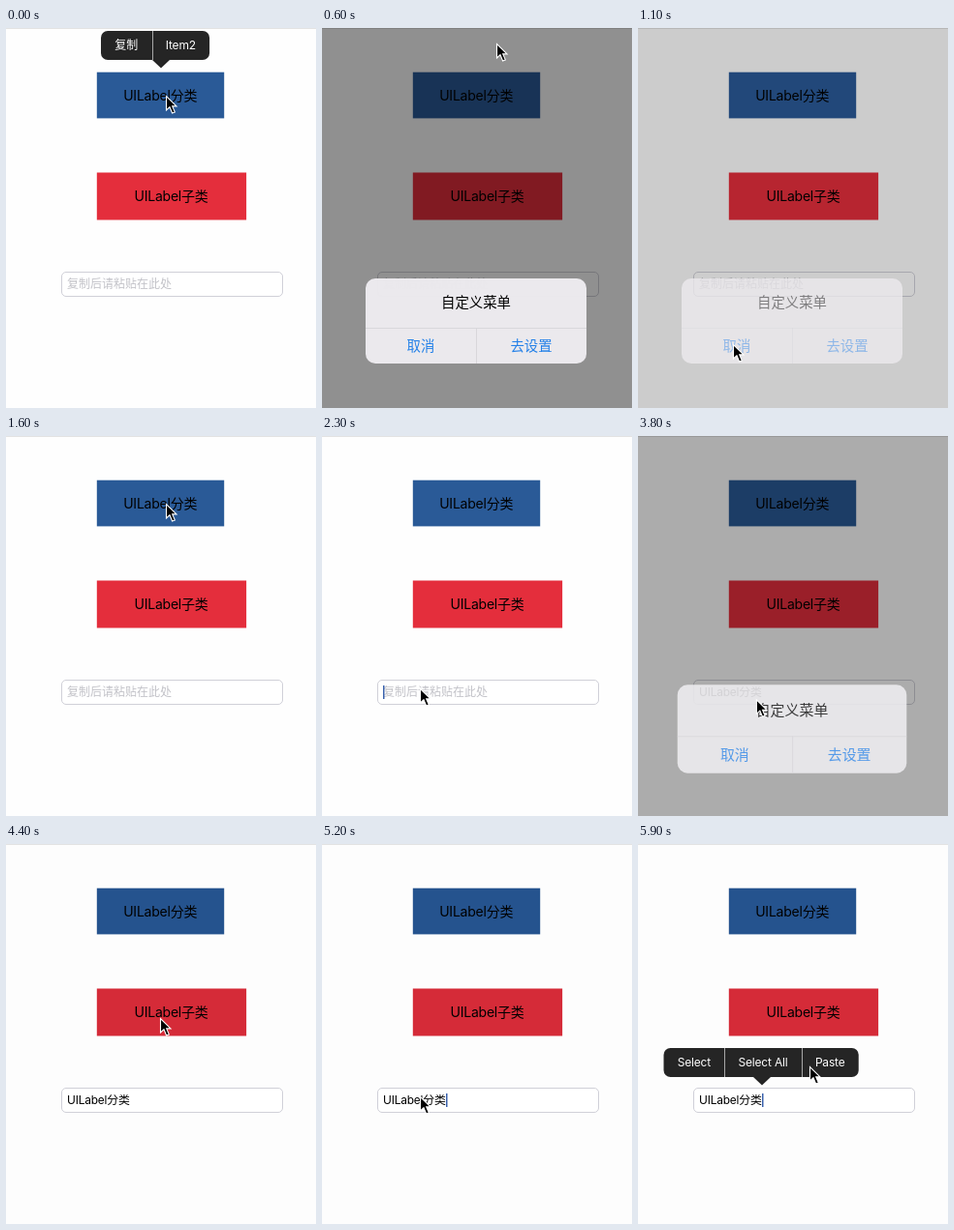
These frames come from a looping animation (320 px wide and 393 px high, 6000 ms). An HTML page with a canvas:

```html
<!DOCTYPE html>
<html lang="zh-CN">
<head>
<meta charset="utf-8">
<style>
html, body { margin: 0; width: 100%; height: 100%; overflow: hidden; background: #fefefe }
canvas { display: block }
</style>
</head>
<body>
<canvas id="stage" width="320" height="393"></canvas>
<script>
const ctx = document.getElementById('stage').getContext('2d');
const LOOP = 6000, STEP = 100, FADE = 200, TRAVEL = 300;
const PASTED = 2700;

const blue = [165, 70], red = [171, 165], cancel = [98, 327], field = [101, 261];
// The pointer rests at each place and needs TRAVEL ms to arrive at the next one
const stops = [
  { at: 0, to: blue },
  { at: 400, to: [180, 16] },
  { at: 1000, to: cancel },
  { at: 1500, to: blue },
  { at: 1900, to: [118, 16] },
  { at: 2200, to: field },
  { at: 2700, to: [68, 228] },
  { at: 3000, to: red },
  { at: 3400, to: [190, 116] },
  { at: 3900, to: cancel },
  { at: 4400, to: [159, 180] },
  { at: 4800, to: [133, 116] },
  { at: 5100, to: field },
  { at: 5800, to: [177, 230] }
];

const clamp = v => Math.max(0, Math.min(1, v));
const ease = v => v * v * (3 - 2 * v);
const fade = (t, start, end) => clamp((t - start) / FADE) * clamp(1 - (t - end) / FADE);

function rect(x, y, w, h, color) {
  ctx.fillStyle = color;
  ctx.fillRect(x, y, w, h);
}

function rounded(x, y, w, h, r, color) {
  ctx.fillStyle = color;
  ctx.beginPath();
  ctx.roundRect(x, y, w, h, r);
  ctx.fill();
}

function setFont(str, size, weight = 400) {
  ctx.font = `${weight} ${size}px Inter, "Noto Sans CJK SC", "Noto Sans CJK", sans-serif`;
  ctx.letterSpacing = /[a-z]/i.test(str) ? `${-0.016 * size}px` : '0px';
}

function text(str, x, y, size, color, align = 'center', weight = 400) {
  setFont(str, size, weight);
  ctx.textAlign = align;
  ctx.fillStyle = color;
  ctx.fillText(str, x, y + size * 0.36);
}

function menu(alpha, left, top, tip, labels) {
  if (!alpha) return;
  const size = 12, height = 30, padding = 28.5;
  const widths = labels.map(label => {
    setFont(label, size);
    return ctx.measureText(label).width + padding;
  });
  const total = widths.reduce((sum, w) => sum + w);
  ctx.globalAlpha = alpha;
  rounded(left, top, total, height, 7, '#252525');
  ctx.fill(new Path2D(`M${tip - 9} ${top + height}h18l-9 8.5Z`));
  let x = left;
  labels.forEach((label, i) => {
    ctx.globalAlpha = 1;
    if (i) rect(Math.round(x) + 0.2, top, 0.6, height, '#fff');
    ctx.globalAlpha = alpha;
    text(label, x + widths[i] / 2, top + height / 2, size, '#fff');
    x += widths[i];
  });
  ctx.globalAlpha = 1;
}

function alertBox(t, start, end) {
  const alpha = fade(t, start, end);
  if (!alpha) return;
  const scale = 1 + 0.15 * (1 - clamp((t - start) / FADE));
  const tint = '#2380e8', line = '#d8d7db';
  rect(0, 0, 320, 393, `rgba(0,0,0,${0.435 * alpha})`);
  ctx.save();
  ctx.translate(159, 303);
  ctx.scale(scale, scale);
  ctx.translate(-159, -303);
  // The panel stays denser than its text while fading
  ctx.globalAlpha = alpha ** 0.3;
  rounded(45, 259, 228, 88, 10, 'rgba(238,236,240,.97)');
  ctx.globalAlpha = alpha;
  rect(45, 310, 228, 1, line);
  rect(159, 310, 1, 37, line);
  text('自定义菜单', 159, 284, 14.4, '#000', 'center', 500);
  text('取消', 102, 328.5, 14.4, tint, 'center', 500);
  text('去设置', 216, 328.5, 14.4, tint);
  ctx.restore();
}

function pointer(t) {
  let [x, y] = stops[0].to;
  for (const { at, to } of stops.slice(1)) {
    const k = ease(clamp((t - at) / TRAVEL + 1));
    x += (to[0] - x) * k;
    y += (to[1] - y) * k;
  }
  const arrow = new Path2D('M.5.5V15L4 11.8 6.6 18 9.3 16.9 6.7 10.9H11Z');
  ctx.save();
  ctx.translate(x, y);
  ctx.fillStyle = '#000';
  ctx.fill(arrow);
  ctx.strokeStyle = '#fff';
  ctx.lineWidth = 1.1;
  ctx.stroke(arrow);
  ctx.restore();
}

function textField(t) {
  const pasted = t >= PASTED;
  rounded(57.5, 252.5, 228, 25, 4.5, '#fff');
  ctx.strokeStyle = '#d0d0d8';
  ctx.lineWidth = 1;
  ctx.stroke();
  if (pasted) text('UILabel分类', 63, 265, 11.9, '#000', 'left');
  else text('复制后请粘贴在此处', 63, 265, 12, '#c2c2c8', 'left');
  const focused = t >= 2200 && t < 2900 || t >= 5100;
  if (focused) rect(pasted ? 128 : 63, 258, 1.5, 14, '#3a62ad');
}

function draw(t) {
  const late = t >= 4300;
  rect(0, 0, 320, 393, late ? '#fdfdfd' : '#fefefe');
  rect(0, 0, 320, 1, '#e2e2e2');
  rect(93.8, 45.7, 131.4, 47.7, late ? '#25538e' : '#2a5a97');
  rect(93.8, 149.5, 154.3, 49, late ? '#d52b38' : '#e42e3c');
  text('UILabel分类', 159.2, 70, 14, '#000');
  text('UILabel子类', 170.5, 174, 14, '#000');
  textField(t);

  const blueMenu = Math.max(fade(t, -FADE, 250), fade(t, 1600, 1900));
  const redMenu = Math.max(fade(t, 3010, 3500), fade(t, 4500, 4800));
  menu(blueMenu, 98, 3, 160, ['复制', 'Item2']);
  menu(redMenu, 109.5, 107, 171, ['复制', 'Item1']);
  menu(fade(t, 2400, PASTED), 34, 211, 64, ['Paste']);
  menu(fade(t, 5400, LOOP), 26.5, 211, 128, ['Select', 'Select All', 'Paste']);

  alertBox(t, 350, 990);
  alertBox(t, 3650, 4150);
  pointer(t);
}

const begin = performance.now();
function tick() {
  const t = (performance.now() - begin) % LOOP;
  draw(Math.floor(t / STEP) * STEP);
  requestAnimationFrame(tick);
}
tick();
</script>
</body>
</html>
```
